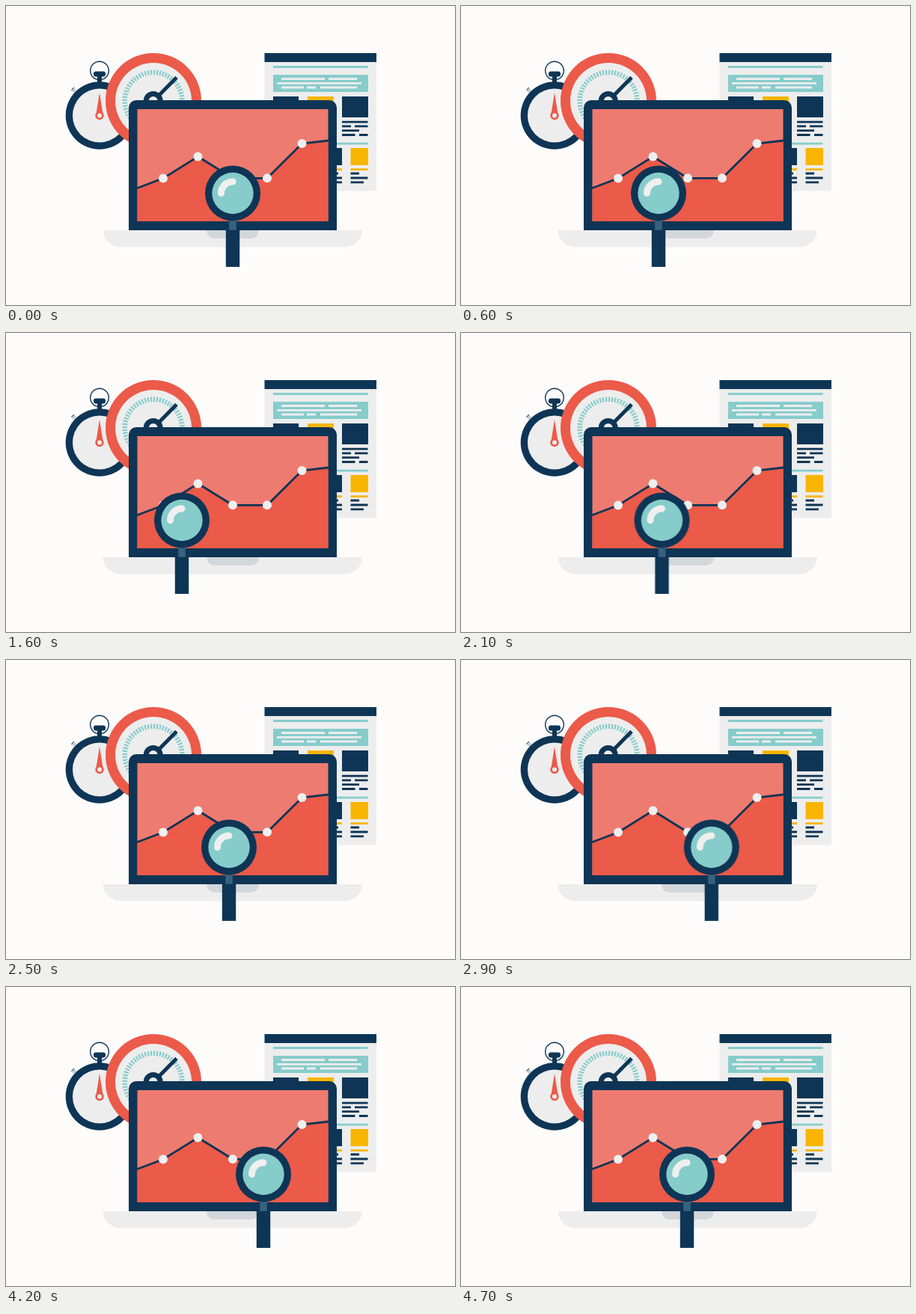
Recreate the animation shown at these times as an HTML page. Size 600 by 400 pixels, loop 4.8 s.

```html
<!DOCTYPE html>
<html lang="en">
<head>
<meta charset="utf-8">
<title>Analytics</title>
<style>
  html, body { margin: 0; width: 100%; height: 100%; overflow: hidden; background: #fdfcfb; }
  svg { display: block; width: 600px; height: 400px; }
  .navy { fill: #0e3555; }
  .red { fill: #ec5a49; }
  .teal { fill: #86cccb; }
  .pale { fill: #ededed; }
  .yellow { fill: #f7b500; }
  .line { fill: none; stroke: #0e3555; }

  /* Each stretch advances in 100 ms steps; the small delay keeps samples off the step edges. */
  #lens { animation: sweep 4800ms -10ms infinite; }
  @keyframes sweep {
    0%       { transform: translateX(303px); animation-timing-function: steps(6); }
    12.5%    { transform: translateX(264px); animation-timing-function: steps(6); }
    25%      { transform: translateX(214px); animation-timing-function: steps(1); }
    27.0833% { transform: translateX(212px); animation-timing-function: steps(3); }
    33.3333% { transform: translateX(235px); animation-timing-function: steps(2); }
    37.5%    { transform: translateX(247px); animation-timing-function: steps(6); }
    50%      { transform: translateX(290px); animation-timing-function: steps(1); }
    52.0833% { transform: translateX(298px); animation-timing-function: steps(5); }
    62.5%    { transform: translateX(344px); animation-timing-function: steps(4); }
    70.8333% { transform: translateX(375px); animation-timing-function: steps(2); }
    75%      { transform: translateX(393px); animation-timing-function: steps(6); }
    87.5%    { transform: translateX(344px); animation-timing-function: steps(5); }
    97.9167% { transform: translateX(302px); animation-timing-function: steps(1); }
    100%     { transform: translateX(303px); }
  }
</style>
</head>
<body>
<svg viewBox="0 0 600 400">
  <g id="stopwatch">
    <path d="M88.5 110.5l4 4" stroke="#c3ccd4" stroke-width="5"/>
    <path d="M91 109l-3.5 3.5" class="line" stroke-width="1"/>
    <circle class="line" cx="125" cy="86.5" r="12.3" stroke-width="1.4"/>
    <rect class="navy" x="122" y="92" width="6" height="12"/>
    <rect class="navy" x="117" y="87.5" width="16" height="7" rx="3"/>
    <circle class="navy" cx="125" cy="146.5" r="45.3"/>
    <circle class="pale" cx="125" cy="146.5" r="36"/>
    <path class="red" d="M125 116l4.8 30h-9.6z"/>
    <circle class="red" cx="125" cy="146.5" r="5.7"/>
    <circle class="pale" cx="125" cy="146.5" r="3"/>
  </g>

  <g id="gauge">
    <circle class="red" cx="197" cy="127" r="64"/>
    <circle class="pale" cx="197" cy="127" r="51"/>
    <circle cx="197" cy="127" r="38.3" fill="none" stroke="#86cccb" stroke-width="6.5" pathLength="120" stroke-dasharray="1.1 .9"/>
    <path class="line" d="M197 127L228 95.5" stroke-width="5"/>
    <circle class="navy" cx="196.7" cy="127" r="13"/>
    <circle class="pale" cx="196.7" cy="127" r="6"/>
  </g>

  <g id="page">
    <path class="pale" d="M345.5 63H495V247.5H345.5z"/>
    <path class="navy" d="M345.5 63H495V75H345.5z"/>
    <path class="teal" d="M357 80H483.5V83H357zM357 92H484V115H357zM357 182.8H483.5V185.5H357z"/>
    <path d="M368 97.5h58m5 0h38M362 103.3h113M368 109h30m4 0h12m6 0h49" stroke="#ededed" stroke-width="2.8"/>
    <path class="navy" d="M357 121h34v28h-34zM449 121h35v28h-35zM415 190h34v23h-34z"/>
    <path class="yellow" d="M403 121h35v28h-35zM460.5 190h23.5v23h-23.5z"/>
    <path d="M415 218.6h34m11.5 0h23" stroke="#f7b500" stroke-width="2.8"/>
    <path class="line" stroke-width="2.8" d="M449 155.2h34.5M449 160.8h12m5 0h17.5M449 166.7h23M449 172.5h17.5m5.500 0h11.500
      M415 224h29m16.500 0h11.500M415 230h34m11.500 0h23M415 235.8h34m11.500 0h17.500"/>
  </g>

  <g id="laptop">
    <path class="pale" d="M129.500 300H476A24 22.500 0 0 1 453 322.500H152.500A24 22.500 0 0 1 129.500 300z"/>
    <path fill="#d3d7dc" d="M268 300H338Q337 311 327 311H279Q269 311 268 300z"/>
    <path class="navy" d="M164 300V136a10 10 0 0 1 10-10H432a10 10 0 0 1 10 10V300z"/>
    <path fill="#ee7b70" d="M175.500 138H430.500V288H175.500z"/>
    <path class="red" d="M175.500 243.500L210 230.500 256.500 201.500 303 230.300H349L395.500 184 430.500 180V288H175.500z"/>
    <path class="line" stroke-width="2.800" d="M175 243.700L210 230.500 256.500 201.500 303 230.300H349L395.500 184 431 180"/>
    <g fill="#efefef">
      <circle cx="210" cy="230.500" r="6"/>
      <circle cx="256.500" cy="201.500" r="6"/>
      <circle cx="303" cy="230.300" r="6"/>
      <circle cx="349" cy="230.300" r="6"/>
      <circle cx="395.500" cy="184" r="6"/>
    </g>
  </g>

  <g id="lens">
    <path fill="#37627f" d="M-4.800 286H4.800V300H-4.800z"/>
    <path class="navy" d="M-9.200 299.700H9.200V349H-9.200z"/>
    <circle class="navy" cy="250.500" r="37"/>
    <circle class="teal" cy="250.500" r="27.700"/>
    <path d="M-15.500 250.500A15.500 15.500 0 0 1 0 235" fill="none" stroke="#efefef" stroke-width="9" stroke-linecap="round"/>
  </g>
</svg>
</body>
</html>
```
